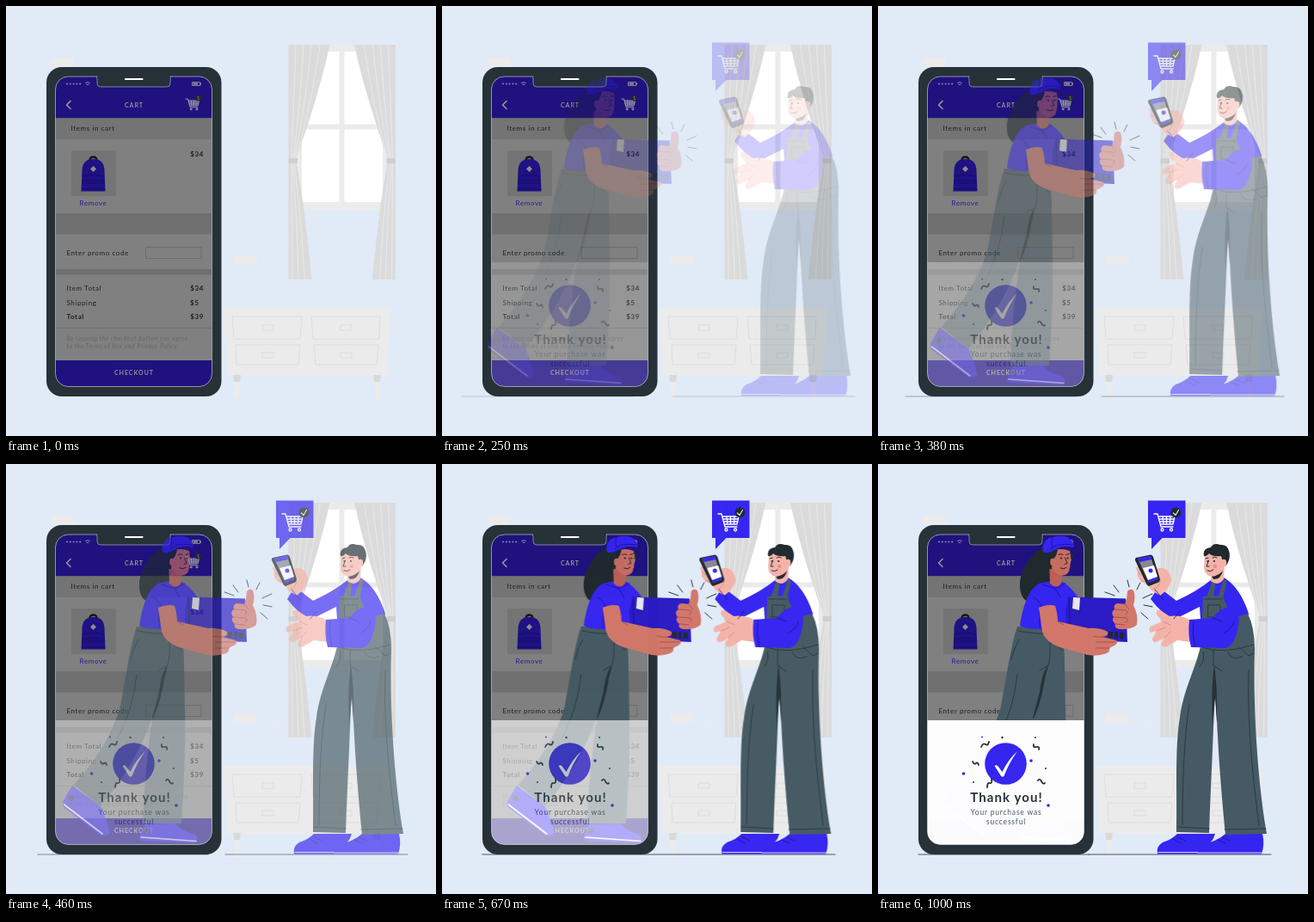
These frames come from a looping animation (500x500 px, 1040 ms). An HTML page:

```html
<!DOCTYPE html>
<html lang="en">
<head>
<meta charset="utf-8">
<title>Checkout</title>
<style>
html, body { margin: 0; width: 100%; height: 100%; overflow: hidden; background: #e1eaf7; }
svg { display: block; width: 100vw; height: 100vh; }
text { font-family: Lato, Inter, sans-serif; font-size: 8px; letter-spacing: .6px; }
.b { font-weight: 700; }
.end { text-anchor: end; }
.mid { text-anchor: middle; }
.caps { font-size: 7px; font-weight: 700; letter-spacing: 1px; fill: #929292; }
.line { fill: none; stroke-linecap: round; stroke-linejoin: round; }
.blue { fill: #3525f1; }
.cloth { fill: #455a64; }
.dark { fill: #263238; }
.ink { fill: #1f292e; }
.pale { fill: #f4b3a9; }
.tan { fill: #d2776a; }
.crease { stroke: #263238; stroke-width: .8; }
.fold { stroke: #1b1187; stroke-width: .8; }

.woman, .man, .bubble, .sheet { animation: 1040ms infinite; }
.woman { --from: -30px; animation-name: slide; }
.man { --from: 30px; animation-name: slide; }
.bubble { --from: 0px; animation-name: slide; }
.sheet { animation-name: cover; }
@keyframes slide {
  0% { opacity: 0; transform: translateX(var(--from)); animation-timing-function: cubic-bezier(.36, -.01, .5, 1.38); }
  96.154%, 100% { opacity: 1; transform: none; }
}
@keyframes cover {
  0% { opacity: 0; animation-timing-function: cubic-bezier(.35, .15, .85, .9); }
  96.154%, 100% { opacity: .985; }
}
</style>
</head>
<body>
<svg viewBox="0 0 500 500">
<defs>
  <clipPath id="screen"><rect x="57.500" y="82" width="182" height="360.500" rx="15"/></clipPath>
  <g id="curtain">
    <path fill="#dbdbdb" d="M328.500 45H376.500C367 90 352 135 338 177V183C345 220 351 270 355.500 318H328.500Z"/>
    <path class="line" stroke="#e6e6e6" stroke-width="1.300" d="M337 46Q334 120 332 178M346 46Q341 125 334 178M355 46Q347 125 335 178M365 46Q353 125 337 178M332 184L333 317M333 184Q339 250 340 317M335 184Q343 240 347 317"/>
    <path fill="#d0d0d0" d="M328.500 177H339V183H328.500Z"/>
  </g>
  <g id="cart" class="line">
    <path d="M0 1H4L8 16H22M4.500 4H24L22 13H7.500M5.500 7H23.500M6.500 10H23M10 4L11 13M14.500 4V13M19 4L18.500 13"/>
    <circle cx="9.500" cy="19.500" r="1.500"/><circle cx="20" cy="19.500" r="1.500"/>
  </g>
  <path id="handle" d="M0 0H13V6H0Z"/>
</defs>

<!-- room -->
<g fill="#ebebeb">
  <path d="M52 60H79V71H52ZM265 290H292V301H265Z"/>
  <path opacity=".45" d="M307 298H317V305H307Z"/>
  <path d="M338 45H444V237H338Z"/>
  <path fill="#fff" d="M344 53H387.500V137.500H344ZM393.500 53H438V137.500H393.500ZM344 143.500H387.500V228H344ZM393.500 143.500H438V228H393.500Z"/>
</g>
<use href="#curtain"/>
<use href="#curtain" transform="matrix(-1 0 0 1 781.500 0)"/>
<g fill="#ebebeb">
  <path d="M252 351H447V361L443 430H257L253 361Z"/>
  <path d="M264 430H273L271 455H267ZM427 430H436L434 455H430Z"/>
  <path fill="#d9d9d9" d="M264 429H273L272 437H265ZM427 429H436L435 437H428Z"/>
  <g fill="none" stroke="#d9d9d9" stroke-width=".8">
    <path d="M263 361H344L342 387H265ZM355 361H435L434 387H357ZM267 394H342L340 417H268ZM358 394H433L431 417H360Z"/>
    <use href="#handle" x="298" y="371"/><use href="#handle" x="389" y="371"/>
    <use href="#handle" x="298" y="403"/><use href="#handle" x="389" y="403"/>
  </g>
</g>

<!-- phone -->
<rect class="dark" x="47" y="71" width="203.500" height="383" rx="18"/>
<g clip-path="url(#screen)">
  <path fill="#808080" d="M57 82H240V443H57Z"/>
  <path fill="#1f127f" d="M57 82H240V130.500H57ZM57 412H240V443H57Z"/>
  <path fill="#747474" d="M57 130.500H240V155H57ZM76 168H128V221H76Z"/>
  <path fill="#707070" d="M57 241H240V265.500H57ZM57 306H240V312.500H57ZM57 374H240V375H57Z"/>
  <path class="line" stroke="#999" stroke-width="1.600" d="M75 110.500L70.500 115L75 119.500"/>
  <text class="caps mid" x="149" y="117.500">CART</text>
  <use href="#cart" stroke="#a3a3a3" stroke-width="1.500" transform="translate(209 107.500) scale(.64)"/>
  <circle class="ink" cx="223.500" cy="107" r="3.600"/>
  <text x="222.300" y="109" fill="#999" style="font-size:5px;letter-spacing:0">1</text>
  <g fill="#1c2023">
    <text x="75.500" y="145">Items in cart</text>
    <text class="b end" x="230" y="174.500">$34</text>
    <text class="mid" x="101.500" y="231.500" fill="#261a93">Remove</text>
    <text x="70.500" y="289.500">Enter promo code</text>
    <text x="70.500" y="331">Item Total</text><text class="b end" x="230" y="331">$34</text>
    <text x="70.500" y="347.500">Shipping</text><text class="b end" x="224.500" y="347.500">$5</text>
    <text class="b" x="70.500" y="364">Total</text><text class="b end" x="230" y="364">$39</text>
  </g>
  <path fill="none" stroke="#686868" stroke-width=".8" d="M162.500 280.500H227V293.500H162.500Z"/>
  <g fill="#666" font-style="italic">
    <text x="70.500" y="388.500" style="font-size:7px;letter-spacing:.5px">By tapping the checkout button you agree</text>
    <text x="70.500" y="397.500" style="font-size:7px;letter-spacing:.5px">to the Terms of Use and Privacy Policy.</text>
  </g>
  <text class="caps mid" x="149" y="428.700">CHECKOUT</text>
  <!-- backpack -->
  <path class="line" stroke="#15171c" stroke-width="2.400" d="M97.500 182V179Q98 175.500 101.500 175.500T105.500 179V182"/>
  <path fill="#1e1284" d="M87.500 215.500L88.500 191Q89 178 101.500 178T114.500 191L115.500 215.500Z"/>
  <path class="line" stroke="#140a5c" stroke-width=".8" d="M89 198Q101.500 195 114 198M89 203H114M89 206H114M88 213H115"/>
  <path fill="#8c8c8c" d="M101.500 186L105 189.500L101.500 193L98 189.500Z"/>
  <!-- status bar -->
  <path class="line" stroke="#8b88ad" stroke-width="2" stroke-dasharray="0 3.800" d="M71 90.500H87"/>
  <path class="line" stroke="#8b88ad" stroke-width="1" d="M92.500 89.500Q95 87.500 97.500 89.500M94 91.300H96"/>
  <path fill="none" stroke="#9a9a9a" stroke-width=".8" d="M216.500 88.500H225.500V92.500H216.500Z"/>
  <path fill="#9a9a9a" d="M217.500 89.500H223V91.500H217.500ZM226 89.500H227V91.500H226Z"/>
  <path class="dark" stroke="#a9adb0" stroke-width=".7" d="M104 81Q106 82 106 85V90Q106 94 110 94H187Q191 94 191 90V85Q191 82 193 81Z"/>
</g>
<rect fill="none" stroke="#b9bdc0" stroke-width=".7" x="57.500" y="82" width="182" height="360.500" rx="15"/>
<path class="dark" d="M106.500 80H190.500V84H106.500Z"/>
<path class="line" stroke="#fff" stroke-width="2.200" d="M139 85H158.500"/>

<!-- courier -->
<g class="woman">
  <path class="line" stroke="#263238" stroke-width=".8" d="M47 454H245"/>
  <path class="ink" d="M195 95C182 101 172 113 167 128C162 143 166 160 178 161C192 160 201 148 207 136L207 100Z"/>
  <!-- legs -->
  <path class="blue" d="M87 374L120 398Q128 416 130.500 429Q127 433 121 432L77 399Q75 396 77 391Z"/>
  <path class="line" stroke="#fff" stroke-width="1.600" d="M77.500 396L122 430"/>
  <path class="blue" d="M171 419L207 418Q214 427 230 431Q234 435 231 441L168 438Q164 437 166 432Z"/>
  <path class="line" stroke="#fff" stroke-width="1.600" d="M167 434L231 438.500"/>
  <circle class="dark" cx="86" cy="389" r="3"/><circle class="dark" cx="173" cy="427" r="3"/>
  <path class="cloth" d="M162 189C154 212 150 245 142 286C130 322 110 349 89 373L120 398C148 365 168 330 181 292L197 240H216Q219 214 211 189Z"/>
  <path class="cloth" d="M189 190H211C218 205 217 240 218 285C219 330 217 375 214 418H169C171 360 178 300 190 240Z"/>
  <path class="dark" d="M198 234C193 239 190 250 188 265L179 299C186 288 191 268 194 250Z"/>
  <path class="line crease" d="M163 194Q182 199 213 196M199 198Q202 220 198 234L188 240M207 198Q207 212 214 217M164 204Q158 214 155 227M162 245Q158 285 139 321"/>
  <!-- torso -->
  <path class="blue" d="M187 139L210 134Q223 141 232 154L226 192Q195 195 172 190L175 156Q177 145 187 139Z"/>
  <path class="blue" d="M179 146Q169 160 165 188Q175 193 188 191L193 164Z"/>
  <path class="line fold" d="M191 140L206 145L218 139M206 145L212 155M188 172V190M181 155Q190 160 191 169"/>
  <path fill="#b96057" d="M199 113L215 124L214 137Q209 147 200 139Z"/>
  <!-- head -->
  <path fill="#c66d62" d="M200 103Q211 96 223 101Q225 113 222 125Q218 131 211 129Q201 124 199 111Z"/>
  <path class="ink" d="M193 101Q205 97 209 100Q207 109 203 111L202 122Q190 124 193 101Z"/>
  <ellipse cx="203" cy="114" rx="2.800" ry="4.300" fill="#c66d62"/>
  <path class="line" stroke="#1f292e" stroke-width="1" d="M210 105.500Q213 103.500 215 105.500M219 105.500L222 104.500M217.500 109L220 115.500L217 116.500M212 121Q216 123 219 120.500"/>
  <circle class="ink" cx="213" cy="109.500" r="1.100"/><circle class="ink" cx="220.500" cy="109.500" r="1.100"/>
  <path class="blue" d="M191.500 101Q191 87 203 85Q219 81 225 89Q229 93 227 97Q215 94 207 99Q199 104 193 103Z"/>
  <path class="line fold" d="M201 99Q208 91 226 94M203 85Q201 92 203 97"/>
  <!-- parcel -->
  <path fill="#2a1bc4" d="M222 154.500L288 156.500L290 207L219 204L218 170Z"/>
  <path class="line fold" d="M222 155L224 204"/>
  <path fill="#e8e6ee" d="M227 155L235 155.500L234 170L226 168Z"/>
  <path class="ink" d="M268 195L273 195V202H268ZM275 195H279V203H275ZM281 196H286V203H281Z"/>
  <path class="tan" d="M187 167Q199 162 206 165Q209 175 209 183L245 191Q257 190 267 195Q269 200 261 201L277 205Q280 208 275 211L269 214Q271 219 263 221Q249 225 237 220L211 213Q195 207 191 195Z"/>
  <path class="line" stroke="#9c4b43" stroke-width=".8" d="M250 200Q257 202 262 201M254 207L276 207M253 214L269 214M209 183L216 187"/>
  <!-- thumb up -->
  <path class="tan" d="M287 163Q290 156 290 148Q293 144 297 147Q300 154 297 164Q303 176 301 187Q295 193 281 192Q274 191 276 186Q271 182 274 178Q270 172 275 169Q273 163 279 162Z"/>
  <path class="line" stroke="#9c4b43" stroke-width=".8" d="M275 169L288 170Q292 172 288 175M274 178L289 179Q292 182 288 184M276 186L287 187M287 163L292 169"/>
  <path class="line" stroke="#263238" stroke-width="1" d="M274 141L280 149M290 135L292 143M305 138L301 146M264 149L275 153M308 156L319 151M309 164L319 166M306 173L314 180"/>
</g>

<!-- customer -->
<g class="man">
  <path class="line" stroke="#263238" stroke-width=".8" d="M245 454H457"/>
  <path class="blue" d="M348 430H392Q389 442 376 446L371 453.500H325Q323 445 331 440Q341 437 348 430Z"/>
  <path class="blue" d="M404 430H447Q450 442 446 453.500H370Q369 446 377 442Q394 439 404 430Z"/>
  <path class="line" stroke="#fff" stroke-width=".8" d="M326 451.500H371M371 452H446"/>
  <path class="line fold" d="M343 436L352 441M348 433L357 438M395 437L404 441M401 434L409 438"/>
  <path class="blue" d="M387 135L402 132Q421 143 431 174L420 210H377L374 166L344 181Q329 173 317 157L326 143L347 159Q371 148 387 135Z"/>
  <!-- overalls -->
  <path class="cloth" d="M378 154L401 153Q405 168 416 178L430 174Q438 190 438 215C436 270 440 360 452 430L404 431C399 380 394 320 392 242C391 300 387 370 385 429L347 428C348 380 345 330 351 295C355 262 371 235 376 207L377 181Z"/>
  <path class="cloth" d="M382 155L389 135L393 135L390 155ZM395 155L402 134Q406 135 405 139L401 157Z"/>
  <path class="dark" d="M391 233C388 255 388 280 389 305L392 272L394 300Q395 260 391 233Z"/>
  <path class="line crease" d="M379 157H400M384 164H398V178H384ZM377 213Q400 222 437 210M390 216V234L400 241M407 219Q411 229 424 224M419 212L431 223L437 220M378 218Q381 227 374 236M362 280Q354 330 354 419M431 240C429 310 437 370 443 421M348 422L385 424M403 425L451 424"/>
  <!-- head -->
  <path class="pale" d="M387 121L403 116L402 134Q395 143 387 136Z"/>
  <path class="ink" d="M387 129Q396 131 401 124Q399 134 390 134Z"/>
  <path class="pale" d="M380 106Q389 98 401 103L402 119Q398 130 388 131Q379 129 379 119Z"/>
  <path class="ink" d="M379 107Q377 98 387 97Q390 91 398 94Q406 93 408 101Q411 110 404 119L401 114L399 107Q389 108 385 104Q382 108 379 107Z"/>
  <ellipse class="pale" cx="402" cy="115" rx="3.200" ry="4.200"/>
  <path class="line" stroke="#1f292e" stroke-width="1" d="M381 110L384 109M389 109Q392 107 394 109M384.500 112L382 119L385 119M383 124Q387 126 390 123"/>
  <circle class="ink" cx="383.500" cy="113" r="1.100"/><circle class="ink" cx="391" cy="113" r="1.100"/>
  <circle cx="392" cy="119" r="2.300" fill="#ec8d86"/>
  <!-- raised hand and handset -->
  <path class="pale" d="M318 124Q327 119 334 122Q341 127 341 136Q338 146 328 153L318 147L314 141L306 136Q300 131 302 126L300 121Q302 117 307 119Z"/>
  <path class="ink" d="M300 109L317 105.500Q319 105.500 320 108L328 134Q328 137 325 138L315 142Q313 142 312 139L299 112Q298.500 110 300 109Z"/>
  <path fill="#8a8794" d="M302 110L317 107L325 134L315 138Z"/>
  <path class="blue" d="M302 110L317 107L318 111L304 114ZM313.500 134.500L324 131L325 134L315 138Z"/>
  <path fill="#fff" d="M308 121L321 118L325 131L314 135Z"/>
  <circle class="blue" cx="317" cy="124" r="2.500"/>
  <path class="line" stroke="#d78075" stroke-width=".8" d="M302 126L306 129M306 136L310 137M328 135Q328 143 321 145"/>
  <!-- reaching arm -->
  <path class="pale" d="M364 182Q351 175 339 177L328 170Q323 169 324 175L331 183L317 189Q314 192 317 196L324 194L319 203Q319 208 324 207L333 202L329 210Q332 215 338 211L348 205L364 207Z"/>
  <path class="line" stroke="#d78075" stroke-width=".8" d="M331 183L340 187M324 194L334 190M333 202L340 195"/>
  <path class="blue" d="M362 181L389 179Q401 164 415 165Q423 178 417 197Q413 212 404 214L364 213Q360 198 362 181Z"/>
  <path class="line fold" d="M367 183Q365 198 369 212M389 179L400 183M403 196Q412 192 414 183M344 180L351 171M322 146L332 158"/>
</g>

<!-- order bubble -->
<g class="bubble">
  <path class="blue" d="M314 42.500H357.500V86H330.500L318 99V86H314Z"/>
  <use href="#cart" stroke="#fff" stroke-width="1.300" transform="translate(321 57)"/>
  <circle class="ink" cx="346.500" cy="56.500" r="6"/>
  <path class="line" stroke="#d8d8e0" stroke-width="1.300" d="M343.500 57L346 59.500L349.500 53.500"/>
</g>

<!-- confirmation -->
<g class="sheet" clip-path="url(#screen)">
  <path fill="#fff" d="M57 298H240V443H57Z"/>
  <circle class="blue" cx="148.500" cy="348.500" r="24.300"/>
  <path fill="#fff" d="M135.500 351Q138 349 140 352L144.500 358Q151 344 162 334Q152 348 146.500 363Q144 365 142.500 362Z"/>
  <path class="line" stroke="#263238" stroke-width="1.800" d="M120 329Q122 324 125 326T129 323M181 326Q180 330 184 329T187 332M110 346Q112 350 114 348T117 350M127 376Q127 370 130 371T132 366M186 368Q188 365 190 369T194 371"/>
  <g class="blue">
    <circle cx="178" cy="345" r="1.800"/><circle cx="99.500" cy="360" r="1.800"/>
    <circle cx="198" cy="397" r="1.800"/><circle cx="121" cy="317.500" r="1"/>
  </g>
  <g class="dark">
    <circle cx="144.500" cy="318" r="1.200"/><circle cx="195" cy="354" r="1"/>
    <circle cx="111" cy="370" r="1"/><circle cx="183" cy="318" r="1"/>
  </g>
  <text class="b mid" x="149.500" y="393" fill="#263238" style="font-size:15px;letter-spacing:1.100px">Thank you!</text>
  <g class="mid" fill="#455a64">
    <text x="149" y="408" style="font-size:8.500px;letter-spacing:.8px">Your purchase was</text>
    <text x="149" y="418.500" style="font-size:8.500px;letter-spacing:.8px">successful</text>
  </g>
</g>
</svg>
</body>
</html>
```
